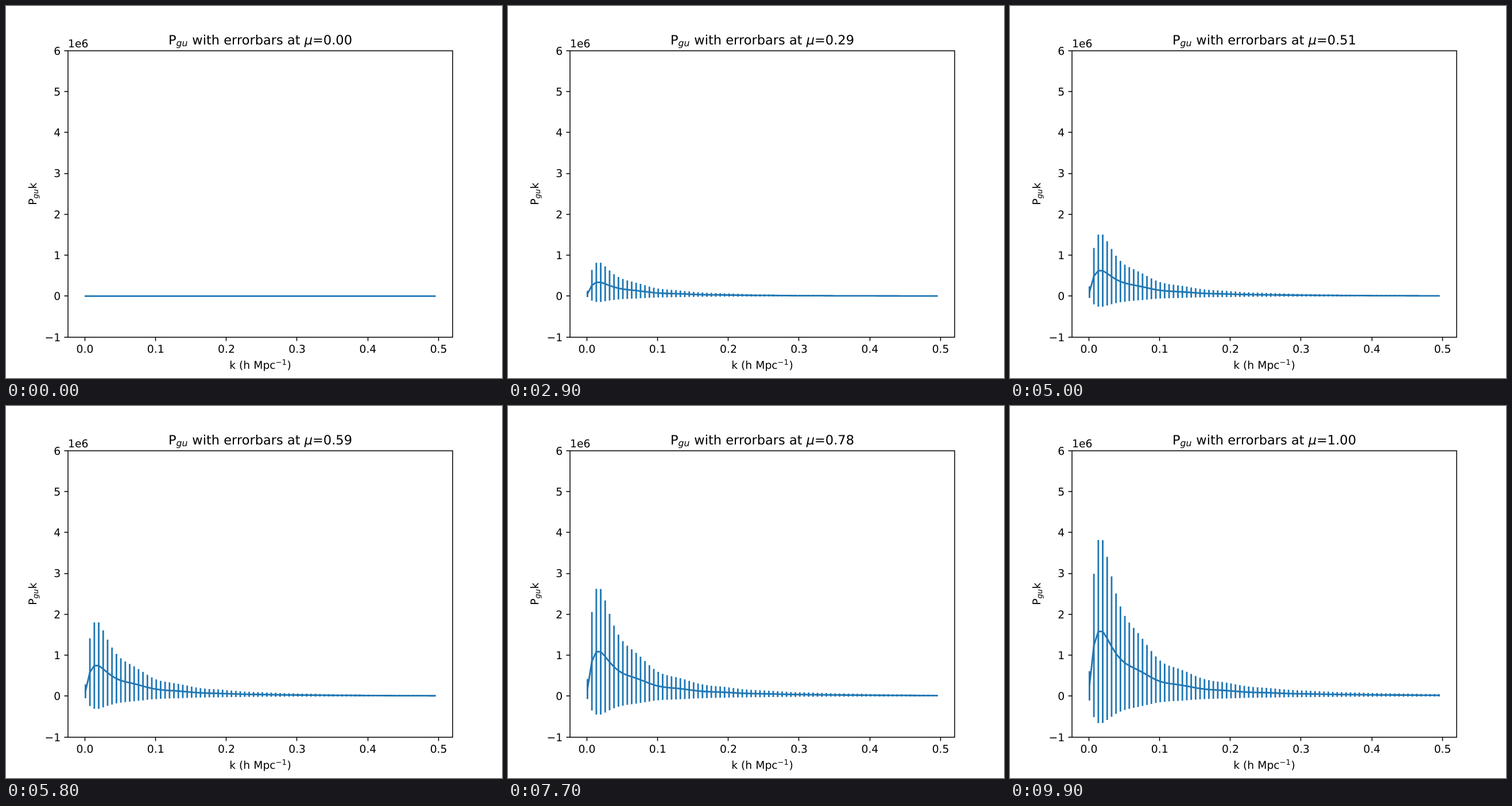
Write an HTML page that moves like this. It is 864 by 648 pixels and loops after 10000 ms.

```html
<!DOCTYPE html>
<html lang="en">
<head>
<meta charset="utf-8">
<title>Power spectrum with error bars</title>
<style>
  html, body { margin: 0; width: 100%; height: 100%; overflow: hidden; background: #fff; }
  svg { display: block; }
  text { font: 18.75px "DejaVu Sans", sans-serif; text-rendering: geometricPrecision; }
  .title { font-size: 22.5px; }
  .small { font-size: 70%; }
  .it { font-style: oblique; }
  .mid { text-anchor: middle; }
  .end { text-anchor: end; }
  path { fill: none; }
  #axes { stroke: #000; stroke-width: 1.5; }
  .data { stroke: #1f77b4; stroke-width: 2.8125; }
  #curve { stroke-linecap: square; stroke-linejoin: round; }
</style>
</head>
<body>
<svg width="864" height="648" viewBox="0 0 864 648">
  <path id="bars" class="data"/>
  <path id="curve" class="data"/>
  <path id="axes"/>
  <g id="labels"></g>
  <text x="108" y="72.1">1e6</text>
  <text class="title mid" x="443" y="66.5">P<tspan class="small it" dy="3.7">gu</tspan><tspan dx="0.6" dy="-3.7"> with errorbars at </tspan><tspan class="it">μ</tspan>=<tspan id="mu">0.00</tspan></text>
  <text class="mid" x="443" y="632.4">k (h Mpc<tspan class="small" dy="-7.2">−1</tspan><tspan dx="0.5" dy="7.2">)</tspan></text>
  <text class="mid" transform="translate(52.8 327.2) rotate(-90)">P<tspan class="small it" dy="3.1">gu</tspan><tspan dx="0.5" dy="-3.1">k</tspan></text>
</svg>
<script>
const $ = id => document.getElementById(id);
const LEFT = 108, RIGHT = 778, TOP = 78, BOTTOM = 577, TICK = 6.56;
const ZERO = 505.44, UNIT = 71.28, COUNT = 80, ERR = Math.SQRT2;
const xOf = k => 137.2 + 1232.2 * k;

// Axes, ticks and tick labels
let axes = `M${LEFT} ${TOP}H${RIGHT}V${BOTTOM}H${LEFT}Z`, labels = '';
for (let i = 0; i <= 5; i++) {
  const x = xOf(i / 10);
  axes += `M${Math.floor(x) + 0.5} ${BOTTOM}v${TICK}`;
  labels += `<text class="mid" x="${x + 0.3}" y="603.9">${(i / 10).toFixed(1)}</text>`;
}
for (let v = -1; v <= 6; v++) {
  const y = ZERO - v * UNIT;
  axes += `M${LEFT} ${Math.round(y)}h${-TICK}`;
  labels += `<text class="end" x="95.2" y="${y + 6.85}">${v < 0 ? '−1' : v}</text>`;
}
$('axes').setAttribute('d', axes);
$('labels').innerHTML = labels;

// Spectrum at mu = 1 in pixels: a smooth transfer function with damped acoustic wiggles
function spectrum(k) {
  const shape = 0.204 * (0.809 + 0.191 / (1 + (43 * k) ** 4));
  const q = k / shape;
  const log = Math.log(2 * Math.E + 1.8 * q);
  const transfer = log / (log + (14.2 + 731 / (1 + 62.5 * q)) * q * q);
  const envelope = 0.1 * Math.exp(-k / 0.18) * (1 - Math.exp(-((k / 0.05) ** 2)));
  const wiggle = 1 + envelope * Math.cos(102 * (k - 0.0745));
  return 13876 * k ** 0.96 * transfer ** 2 * wiggle;
}

const points = Array.from({ length: COUNT }, (_, i) => {
  const k = 0.001 + 0.494 * i / (COUNT - 1);
  return { x: xOf(k), mean: spectrum(k) };
});

function draw() {
  const mu = Math.floor(performance.now() / 100) % 100 / 99;
  const scale = mu * (0.705 + 0.295 * mu * mu);
  let bars = '', curve = '';
  points.forEach(({ x, mean }, i) => {
    const h = mean * scale, y = ZERO - h;
    bars += `M${x} ${y - ERR * h}V${y + ERR * h}`;
    curve += `${i ? 'L' : 'M'}${x} ${y}`;
  });
  $('bars').setAttribute('d', bars);
  $('curve').setAttribute('d', curve);
  $('mu').textContent = mu.toFixed(2);
  requestAnimationFrame(draw);
}
draw();
</script>
</body>
</html>
```
